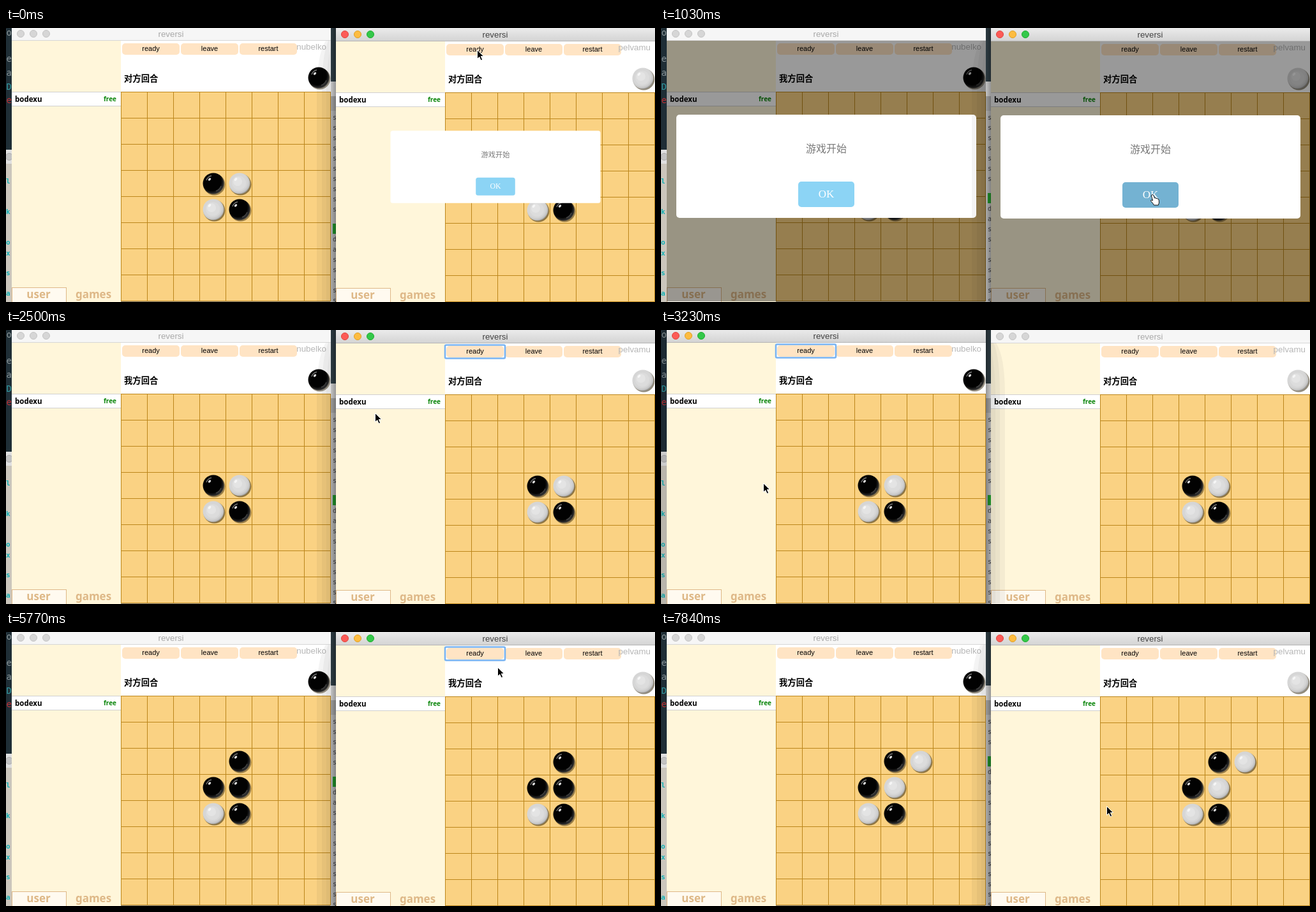
An HTML page that plays this animation: 1017 px wide and 430 px high, repeating every 7990 ms.

```html
<!DOCTYPE html>
<html lang="zh-CN">
<head>
<meta charset="utf-8">
<title>reversi</title>
<style>
  html, body { margin: 0; width: 100%; height: 100%; overflow: hidden; background: #888; }
  svg { display: block; width: 1017px; height: 430px; }
  text { font-family: "Liberation Sans", Arial, sans-serif; }
  .mid { text-anchor: middle; }
  .end { text-anchor: end; }
  .cjk { font-family: "Noto Sans CJK SC", "Noto Sans CJK JP", sans-serif; }
  .fat { font-family: Impact, "Noto Sans", "Open Sans", sans-serif; font-weight: 900; font-stretch: extra-condensed; }
  .serif { font-family: "Liberation Serif", "Times New Roman", serif; }
  .mono { font-family: "DejaVu Sans Mono", monospace; }
</style>
</head>
<body>
<svg viewBox="0 0 1017 430" xmlns="http://www.w3.org/2000/svg">
  <defs>
    <linearGradient id="bar" x2="0" y2="1">
      <stop stop-color="#ebebeb"/><stop offset="1" stop-color="#d3d3d3"/>
    </linearGradient>
    <linearGradient id="shade">
      <stop stop-color="#000" stop-opacity=".12"/><stop offset="1" stop-color="#000" stop-opacity=".38"/>
    </linearGradient>
    <radialGradient id="ink" cx=".42" cy=".4" r=".62">
      <stop offset=".72" stop-color="#020202"/><stop offset="1" stop-color="#3c3c3c"/>
    </radialGradient>
    <radialGradient id="pearl" cx=".44" cy=".42" r=".6">
      <stop offset=".72" stop-color="#d6d6d6"/><stop offset=".9" stop-color="#c2c2c2"/><stop offset="1" stop-color="#8a8a8a"/>
    </radialGradient>
    <g id="black">
      <circle cx="1.4" cy="1.6" r="17" fill="#3a2c10" opacity=".5"/>
      <circle r="16.5" fill="url(#ink)"/>
      <path d="M-11 -5Q-9 -11 -3 -12" fill="none" stroke="#777" stroke-width="1.3"/>
      <ellipse cx="-6" cy="-6.5" rx="2.6" ry="1.7" transform="rotate(-45 -6 -6.5)" fill="#ddd"/>
      <path d="M4 12Q10 10 12 4" fill="none" stroke="#444" stroke-width="1.5"/>
    </g>
    <g id="white">
      <circle cx="1.4" cy="1.6" r="17" fill="#3a2c10" opacity=".55"/>
      <circle r="16.5" fill="url(#pearl)"/>
      <circle cx="-1" cy="-1" r="11" fill="#dcdcdc"/>
      <circle cx="-3" cy="-3" r="7" fill="#e4e4e4"/>
      <ellipse cx="-6" cy="-6.5" rx="2.8" ry="1.8" transform="rotate(-45 -6 -6.5)" fill="#f6f6f6"/>
    </g>
    <path id="arrow" d="M.5 .5V14.5L3.8 11.5L6.1 16.8L8.6 15.7L6.3 10.5H10.6Z" fill="#000" stroke="#fff"/>
    <path id="hand" d="M2 1Q4 -.5 5 2L6.5 6Q8 5 9 6.5Q10.5 5.7 11.3 7.2Q13 7 13.2 9L13.5 13Q13 15 12.3 17H5.5Q4 14 .5 10.5Q-.3 8.4 3.6 9.7L1.6 3Q1.3 1.8 2 1Z" fill="#fff" stroke="#111"/>
    <g id="shadow">
      <path d="M509 20H501Q487 42 487 100V429H509Z" opacity=".045"/>
      <path d="M509 20H505Q495 42 495 100V429H509Z" opacity=".04"/>
      <path d="M509 30Q502 60 502 100V429H509Z" opacity=".03"/>
    </g>
  </defs>
  <g id="stage"></g>
</svg>
<script>
const LOOP = 7990, STEP = 148, LEAD = 25;
const stage = document.getElementById('stage');

// Cursor stops: step, x, y
const path = [
  [0, 738, 34], [1, 738, 34], [5, 767, 261], [8, 767, 261], [12, 267, 262], [15, 267, 262],
  [17, 578, 130], [21, 160, 240], [22, 160, 240], [23, 859, 229], [24, 859, 229],
  [25, 922, 33], [28, 160, 72], [30, 369, 206], [34, 369, 206], [39, 770, 55],
  [42, 912, 201], [43, 912, 201], [45, 880, 290], [47, 922, 33], [49, 922, 33], [53, 698, 273]
];

const rect = (x, y, w, h, fill, more = '') =>
  `<rect x="${x}" y="${y}" width="${w}" height="${h}" fill="${fill}" ${more}/>`;
const text = (x, y, size, fill, str, cls = '', more = '') =>
  `<text x="${x}" y="${y}" font-size="${size}" fill="${fill}" class="${cls}" ${more}>${str}</text>`;
const stone = (kind, x, y) => `<use href="#${kind}" x="${x}" y="${y}"/>`;
const range = (n, fn) => Array.from({ length: n }, (_, i) => fn(i)).join('');
const within = (n, a, b) => n >= a && n < b;

// Piecewise linear value at step n
function along(keys, n, i) {
  const k = keys.findIndex(p => p[0] > n);
  if (k < 0) return keys[keys.length - 1][i];
  const a = keys[k - 1], b = keys[k];
  return a[i] + (b[i] - a[i]) * (n - a[0]) / (b[0] - a[0]);
}

function backdrop(n, leftActive) {
  const dark = [['To', 12, '#9aa5a8'], ['he', 53, '#9aa5a8'], ['ga', 75, '#9aa5a8'], ['JD', 97, '#36a9b0'], ['e', 118, '#d0353b']];
  const cyan = [['l', 244], ['k', 292], ['o', 340], ['x', 357], ['s', 388], ['a', 420]];
  const mark = n < 3 ? 315 : n < 32 ? 267 : n < 43 ? 235 : 203;
  const tail = 'dass:sssssssss';
  const flip = leftActive ? 'transform="translate(1026) scale(-1 1)"' : '';
  return rect(0, 0, 9, 191, '#22323b')
    + dark.map(([s, y, c]) => text(9, y, 14, c, s, 'mono end')).join('')
    + rect(0, 191, 9, 22, '#f3f3f3') + '<circle cx="5" cy="202" r="5.5" fill="#d2d2d2" stroke="#bbb"/>'
    + rect(0, 213, 9, 217, '#dcd7cc')
    + cyan.map(([s, y]) => text(0, y, 11, '#14bfc4', s, 'mono', 'font-weight="700"')).join('')
    + rect(0, 0, 9, 430, '#000', `opacity="${leftActive ? .16 : .08}"`)
    + rect(508, 0, 10, 84, '#33434b') + rect(508, 84, 10, 23, '#e6e6e6')
    + rect(508, 107, 10, 23, '#b5b5b5') + rect(508, 130, 10, 300, '#c9c9c9')
    + range(14, i => 141 + 16 * i < mark - 20 ? text(512, 144 + 16 * i, 10, '#444', 's', 'mono') : '')
    + rect(512, mark - 8, 6, 16, '#25a52f')
    + [...tail].map((c, i) => text(512, mark + 20 + 16 * i, 10, '#444', c, 'mono')).join('')
    + rect(508, 0, 10, 430, 'url(#shade)', flip);
}

function dialog({ scale, alpha, pressed }) {
  return `<g transform="translate(259 217) scale(${scale}) translate(-259 -217)" opacity="${alpha}">`
    + rect(24, 136, 470, 162, '#fff', 'rx="5"')
    + text(259, 195, 16, '#797979', '游戏开始', 'cjk mid')
    + rect(215, 241, 88, 40, pressed ? '#74b2d2' : '#8cd4f5', 'rx="5"')
    + text(259, 266, 17, '#fff', 'OK', 'serif mid') + '</g>';
}

function appWindow(w) {
  const lights = w.active
    ? [['#fc5b57', '#e0443e'], ['#fdbc40', '#dfa023'], ['#34c84a', '#1dad2b']]
    : Array(3).fill(['#d6d6d6', '#c4c4c4']);
  return rect(9, -1, 500, 21, w.active ? 'url(#bar)' : '#f6f6f6') + rect(9, 19, 500, 1, w.active ? '#b4b4b4' : '#d6d6d6')
    + lights.map(([f, s], i) => `<circle cx="${23 + 20 * i}" cy="9" r="5.5" fill="${f}" stroke="${s}"/>`).join('')
    + text(258.5, 13.5, 13.3, w.active ? '#404040' : '#a8a8a8', 'reversi', 'mid')
    + rect(9, 20, 171, 410, '#fff6da') + rect(180, 20, 329, 80, '#fff')
    + rect(9, 100, 171, 23, '#fff') + rect(9, 100, 171, 1, '#d0d0d0') + rect(9, 122, 171, 1, '#d0d0d0')
    + text(14, 115.5, 11.5, '#000', 'bodexu', 'fat') + text(173, 114.5, 10, '#0b860b', 'free', 'fat end')
    + rect(9.5, 407.5, 85, 30, '#fffaf0', 'stroke="#deb887"')
    + text(51, 424, 17, '#deb887', 'user', 'fat mid') + text(137, 424, 17, '#deb887', 'games', 'fat mid')
    + ['ready', 'leave', 'restart'].map((s, i) =>
        rect(182 + 92 * i, 24, 90, 18, '#ffe4c4', 'rx="5"') + text(227 + 92 * i, 36, 11, '#000', s, 'mid')).join('')
    + (w.ring ? rect(180, 22.5, 94, 21, 'none', 'rx="2" stroke="#79b4f2" stroke-width="2.6"') : '')
    + text(502, 34, 13.33, '#b6b6b6', w.name, 'end')
    + text(185, 84, 13.33, '#000', w.mine ? '我方回合' : '对方回合', 'cjk', 'font-weight="700"')
    + stone(w.color, 490, 78)
    + rect(180, 100, 329, 329, '#fad283')
    + range(9, i => rect(180 + 41 * i, 100, 1, 329, '#bc861b') + rect(180, 100 + 41 * i, 329, 1, '#bc861b'))
    + w.board.map(([kind, c, r]) => stone(kind, 202 + 41 * c, 121 + 41 * r)).join('')
    + rect(9, 20, 500, 409, '#000', `opacity="${w.dim}"`)
    + (w.box ? dialog(w.box) : '');
}

// Pop-in from step a, fade-out at step b
function popup(n, a, b, pressed) {
  if (n < a || n > b) return { dim: 0, box: null };
  const k = n - a, closing = n === b;
  return {
    dim: closing ? .2 : Math.min(.4, k * .2),
    box: { scale: closing ? .75 : [.7, 1.03, .99][k] || 1, alpha: closing ? .4 : 1, pressed }
  };
}

function render(n) {
  const leftActive = within(n, 15, 17) || within(n, 21, 36);
  const board = [
    ['black', 3, 3], [within(n, 32, 43) ? 'black' : 'white', 4, 3], ['white', 3, 4], ['black', 4, 4]
  ];
  if (n >= 32) board.push(['black', 4, 2]);
  if (n >= 43) board.push(['white', 5, 2]);
  const left = appWindow({
    name: 'nubelko', color: 'black', board, active: leftActive,
    mine: within(n, 2, 32) || n >= 43, ring: leftActive && within(n, 16, 32), ...popup(n, 2, 15, n === 15)
  });
  const right = appWindow({
    name: 'pelvamu', color: 'white', board, active: !leftActive,
    mine: within(n, 32, 43), ring: !leftActive && within(n, 9, 43), ...popup(n, 0, 8, n === 7)
  });
  const x = along(path, n, 1), y = along(path, n, 2);
  const pointing = within(n, 5, 9);
  stage.innerHTML = backdrop(n, leftActive)
    + left + `<g transform="translate(508 1)">${right}</g>`
    + `<use href="#shadow" ${leftActive ? 'transform="translate(1026) scale(-1 1)"' : ''}/>`
    + `<use href="#${pointing ? 'hand' : 'arrow'}" x="${x}" y="${y}"/>`;
}

let shown = -1;
function tick(now) {
  const n = Math.floor((now % LOOP + LEAD) / STEP);
  if (n !== shown) render(shown = n);
  requestAnimationFrame(tick);
}
tick(performance.now());
</script>
</body>
</html>
```
